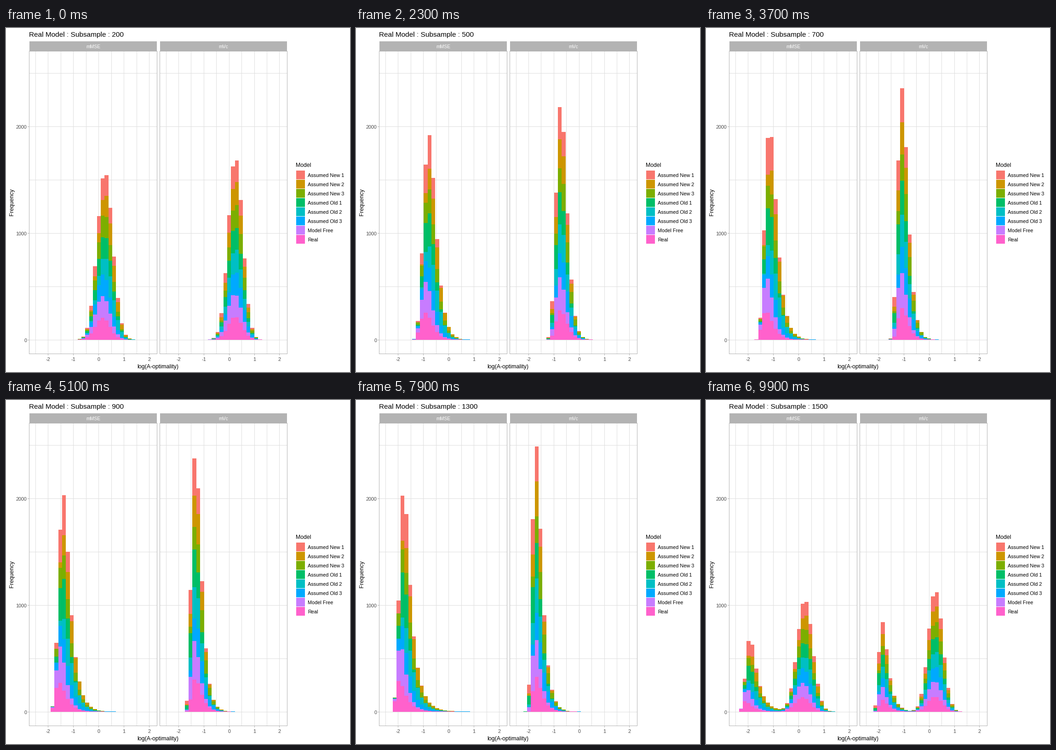
A matplotlib script for the animation above (10000 ms loop, 748 px wide and 748 px high).

```python
import math
import numpy as np
import matplotlib.pyplot as plt
from matplotlib.animation import FuncAnimation
from matplotlib.collections import PolyCollection
from matplotlib.patches import Rectangle

SIZE, DPI = 748, 187
PT = 72 / DPI
plt.rcParams["font.family"] = ["Liberation Sans", "DejaVu Sans"]

GREY, GRID, DARK = "#B3B3B3", "#DEDEDE", "#4D4D4D"
MODELS = [
    ("Assumed New 1", "#F8766D"), ("Assumed New 2", "#CD9600"),
    ("Assumed New 3", "#7CAE00"), ("Assumed Old 1", "#00BE67"),
    ("Assumed Old 2", "#00BFC4"), ("Assumed Old 3", "#00A9FF"),
    ("Model Free", "#C77CFF"), ("Real", "#FF61CC"),
]
# name, left, right, x of zero
PANELS = [("mMSE", 50, 328, 201.7), ("mVc", 334, 611, 485.2)]
TOP, BOTTOM, BASE = 50, 708, 678
UNIT, BIN_W, PER_COUNT = 54.87, 8.39, 0.232
BINS = np.arange(-16, 14)
SIZES = list(range(200, 1600, 100))

# Per panel: first spread, bend of the medians, and for each model
# the median at size 200, the median and the spread at size 1300 (in bins)
SHAPES = {
    "mMSE": (1.92, 0.19, {
        "real": (1.00, -12.08, 1.60), "free": (1.05, -11.98, 1.14),
        "1": (1.39, -11.60, 0.89), "2": (2.55, -9.78, 1.70),
        "3": (1.47, -10.70, 2.10)}),
    "mVc": (1.82, 0.06, {
        "real": (1.55, -10.58, 1.34), "free": (1.35, -11.18, 1.05),
        "1": (1.40, -11.28, 1.07), "2": (1.75, -10.66, 1.26),
        "3": (1.95, -9.97, 1.58)}),
}
STACK = ["real", "free", "3", "2", "1", "3", "2", "1"]  # bottom to top
normal_cdf = np.vectorize(lambda z: 0.5 * (1 + math.erf(z / math.sqrt(2))))


def bin_counts(panel, model, n):
    """Expected counts of 1000 skewed samples in each bin."""
    first_spread, bend, shapes = SHAPES[panel]
    first, last, last_spread = shapes[model]
    u = math.log(n / 200) / math.log(1300 / 200)
    arc = 4 * u * (1 - u)
    mid = first + (last - first) * u - bend * arc
    spread = first_spread ** (1 - u) * last_spread ** u * (1 - 0.08 * arc)
    skew = (0.27 if model.isdigit() else 0.385) * last_spread * u + 0.005
    edges = np.append(BINS - 0.5, BINS[-1] + 0.5)
    arg = np.maximum(1 + skew * (edges - mid) / spread, 1e-9)
    return np.round(1000 * np.diff(normal_cdf(np.log(arg) / skew)))


def stacked(n):
    return np.array([np.cumsum([bin_counts(p, m, n) for m in STACK], axis=0)
                     for p in SHAPES])


STATES = [stacked(n) for n in SIZES]


def moment(frame):
    """Stack heights and title size at a frame."""
    # The first three moves take four steps, the rest three
    moves = [(4 + 7 * i + min(i, 3), 4 if i < 3 else 3)
             for i in range(len(SIZES))]
    heights, size = STATES[0], SIZES[0]
    for i, (start, steps) in enumerate(moves):
        step = frame - start + 1
        if step < 1:
            break
        nxt = (i + 1) % len(SIZES)
        w = min(step / steps, 1)
        heights = (1 - w) * STATES[i] + w * STATES[nxt]
        size = SIZES[nxt if step > 2 else i]
    return heights, size


fig = plt.figure(figsize=(SIZE / DPI, SIZE / DPI), dpi=DPI, facecolor="white")
ax = fig.add_axes([0, 0, 1, 1])
ax.set(xlim=(0, SIZE), ylim=(SIZE, 0))
ax.axis("off")


def text(x, y, s, px, color="black", ha="left", **kw):
    kw.setdefault("va", "baseline")
    return ax.text(x, y, s, fontsize=px * PT, color=color, ha=ha, **kw)


def box(x, y, w, h, color, z=1):
    ax.add_patch(Rectangle((x, y), w, h, fc=color, lw=0, zorder=z,
                           antialiased=False))


def y_of(count):
    return BASE - round(PER_COUNT * count)


for name, left, right, zero in PANELS:
    width, height = right - left + 1, BOTTOM - TOP + 1
    for half in range(-5, 5):
        x = math.floor(zero + half / 2 * UNIT)
        box(x, TOP, 1, height, GRID)
        if half % 2 == 0:
            box(x, BOTTOM + 1, 1, 3, GREY)
            text(x + 0.5, 724, str(half // 2), 10.8, DARK, "center")
    for c in range(0, 2501, 500):
        box(left, y_of(c), width, 1, GRID)
    for x in (left, right):
        box(x, TOP, 1, height, GREY, 4)
    for y in (TOP, BOTTOM):
        box(left, y, width, 1, GREY, 4)
    box(left + 1, 29, width - 2, 21, GREY)
    text((left + right + 1) / 2, 44, name, 10.4, "white", "center")

for c in (0, 1000, 2000):
    box(47, y_of(c), 3, 1, GREY)
    text(45.3, y_of(c) + 5, str(c), 10.8, DARK, "right")

text(330.5, 740, "log(A-optimality)", 12.4, ha="center")
text(12.7, 378.7, "Frequency", 12.5, ha="center", va="center", rotation=90)
text(630, 302, "Model", 12.3)
for k, (label, color) in enumerate(MODELS):
    y = 310 + 20 * k
    box(631, y, 19, 19, color)
    text(656, y + 14.2, label, 10.9)

title = text(50, 19, "", 15.4)
bars = []
for _, color in reversed(MODELS):
    bar = PolyCollection([], facecolors=color, edgecolors="none", linewidths=0,
                         antialiaseds=False, zorder=3)
    ax.add_collection(bar, autolim=False)
    bars.append(bar)

lefts = np.round([zero + (BINS - 0.5) * BIN_W for *_, zero in PANELS])
rights = np.round([zero + (BINS + 0.5) * BIN_W for *_, zero in PANELS])


def draw(frame):
    heights, size = moment(frame)
    title.set_text(f"Real Model : Subsample : {size}")
    px = np.maximum(np.round(PER_COUNT * heights), heights >= 0.5)
    low = np.full(lefts.shape, float(BASE))
    for k, bar in enumerate(bars):
        high = BASE - px[:, k]
        corners = [(lefts, low), (rights, low), (rights, high), (lefts, high)]
        quads = np.stack([np.stack(c, -1) for c in corners], axis=2)
        bar.set_verts(quads[low > high])
        low = high
    return [title, *bars]


anim = FuncAnimation(fig, draw, frames=100, interval=100, repeat=True,
                     repeat_delay=0, blit=False)
plt.show()
```
